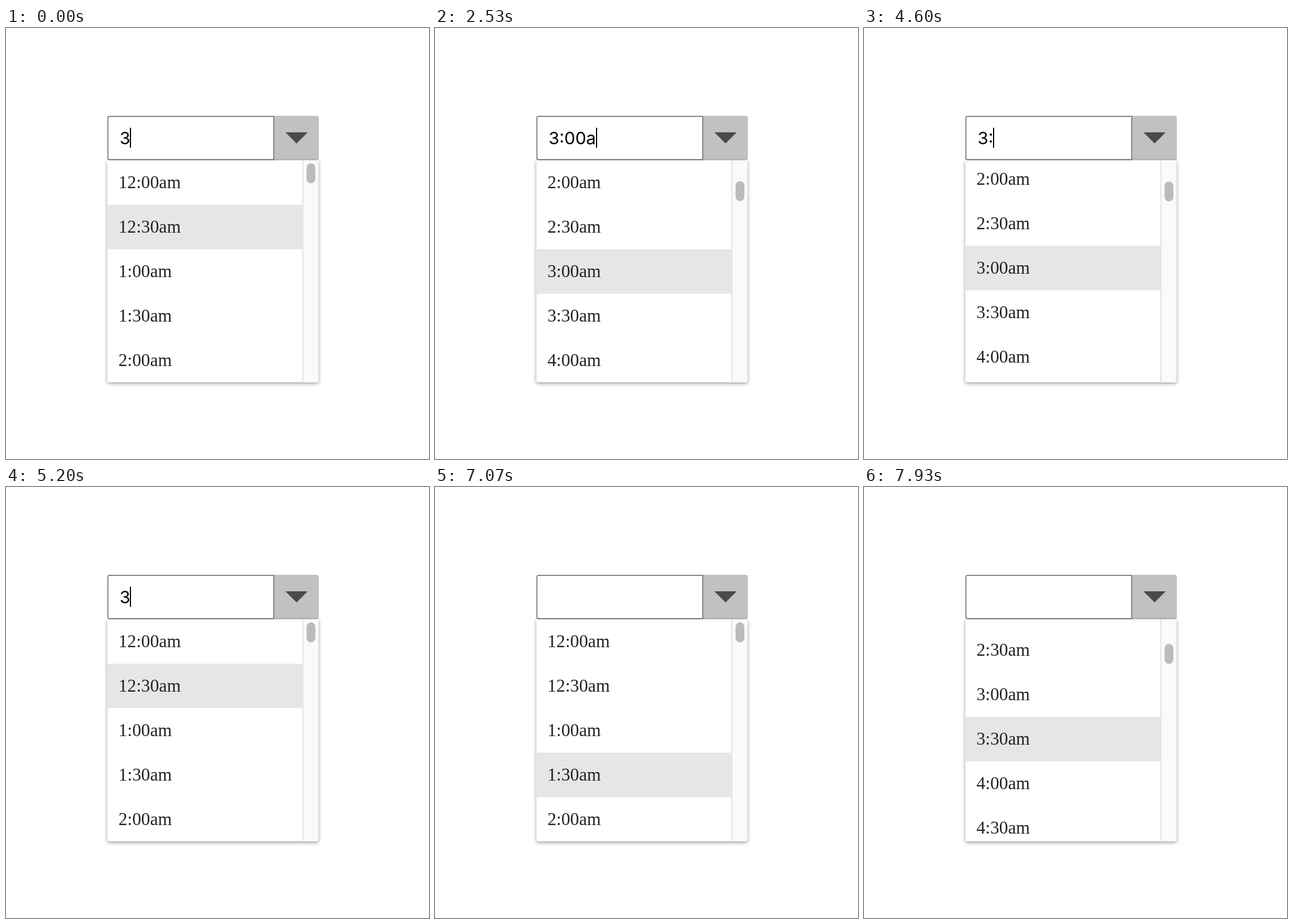
These frames come from a looping animation (741 by 756 pixels, 8000 ms). An HTML page with a canvas:

```html
<!DOCTYPE html>
<html lang="en">
<head>
<meta charset="utf-8">
<title>Time picker</title>
<style>
  html, body { margin: 0; width: 100%; height: 100%; overflow: hidden; background: #fff; }
  canvas { display: block; }
</style>
</head>
<body>
<canvas id="stage" width="741" height="756"></canvas>
<script>
const ctx = document.getElementById('stage').getContext('2d');
const LOOP = 8000, STEP = 1000 / 15;
const BLINK = 500, LOOKUP_DELAY = 105, SCROLL_TIME = 200;
const ROW = 78;
const LIST = { x: 177.5, y: 232, w: 370, h: 389.5, rowsW: 341.5 };

// Bursts of keys: start, gap, keys. "<" is backspace, "v" is arrow down.
const bursts = [
  [-240, 0, '3'], [440, 0, ':'], [1110, 190, '00'], [1970, 130, 'am'],
  [2510, 200, '<<'], [3060, 250, 'pm'], [3910, 140, '<<<<'], [4850, 730, '<<'],
  [6310, 400, 'vv'], [7065, 170, 'vv'], [7392, 200, 'vvv']
];
const keys = bursts.flatMap(([start, gap, chars]) =>
  [...chars].map((char, i) => ({ at: start + i * gap, char })));

const labels = Array.from({ length: 48 }, (_, i) =>
  (Math.floor(i / 2) % 12 || 12) + (i % 2 ? ':30' : ':00') + (i < 24 ? 'am' : 'pm'));

// Text edits pick the first label that contains the text; arrows pick the next row.
const edits = [], picks = [];
let text = '', row = 0;
for (const { at, char } of keys) {
  if (char === 'v') {
    picks.push({ at, row: ++row });
  } else {
    text = char === '<' ? text.slice(0, -1) : text + char;
    row = labels.findIndex(label => label.includes(text));
    edits.push({ at, text, typing: char !== '<' });
    picks.push({ at: at + LOOKUP_DELAY, row });
  }
}

const lastBefore = (events, t) => events.filter(e => e.at <= t).pop();
const swing = p => (1 - Math.cos(Math.PI * Math.min(1, p))) / 2;

// Each pick restarts the glide that brings its row to the middle.
function scrollAt(t) {
  let pos = 0;
  picks.forEach(({ at, row }, i) => {
    if (t < at) return;
    const end = Math.min(t, picks[i + 1]?.at ?? LOOP);
    pos += (Math.max(0, row - 2) * ROW - pos) * swing((end - at) / SCROLL_TIME);
  });
  return pos;
}

// Typing restarts the blink; deleting only shows the caret again.
function caretOn(t) {
  const anchor = lastBefore(edits.filter(e => e.typing), t).at;
  const toggles = time => Math.floor((time - anchor) / BLINK);
  return (toggles(t) - toggles(lastBefore(edits, t).at)) % 2 === 0;
}

function fillRound(x, y, w, h, radius, color) {
  ctx.fillStyle = color;
  ctx.beginPath();
  ctx.roundRect(x, y, w, h, radius);
  ctx.fill();
}

function drawField(text, caret) {
  fillRound(469, 154, 79, 78, [0, 4, 4, 0], '#c1c1c1');
  fillRound(177.5, 154, 292.5, 78, [4, 0, 0, 4], '#858585');
  fillRound(179.5, 156, 288.5, 74, [2, 0, 0, 2], '#fff');

  ctx.fillStyle = '#4a4a4a';
  ctx.beginPath();
  ctx.moveTo(489.5, 183);
  ctx.lineTo(528.5, 183);
  ctx.lineTo(509, 202.5);
  ctx.fill();

  ctx.font = '30.4px Inter, sans-serif';
  ctx.fillStyle = '#000';
  ctx.fillText(text, 199, 204);
  if (caret) ctx.fillRect(Math.round(198.7 + ctx.measureText(text).width), 175, 2, 35);
}

function drawList(scroll, selected) {
  ctx.save();
  ctx.shadowColor = 'rgba(0,0,0,.42)';
  ctx.shadowBlur = 6;
  ctx.shadowOffsetY = 2;
  fillRound(LIST.x, LIST.y, LIST.w, LIST.h, [0, 0, 4, 4], '#fff');
  ctx.restore();

  ctx.save();
  ctx.beginPath();
  ctx.roundRect(LIST.x, LIST.y, LIST.w, LIST.h, [0, 0, 4, 4]);
  ctx.clip();
  ctx.font = '31.2px "Liberation Serif", "Times New Roman", serif';
  labels.forEach((label, i) => {
    const y = LIST.y + i * ROW - scroll;
    if (i === selected) {
      ctx.fillStyle = '#e6e6e6';
      ctx.fillRect(LIST.x, y, LIST.rowsW, ROW);
    }
    ctx.fillStyle = '#222';
    ctx.fillText(label, 197, y + 49);
  });

  ctx.fillStyle = '#fafafa';
  ctx.fillRect(519, LIST.y, 29, LIST.h);
  ctx.fillStyle = '#e4e4e4';
  ctx.fillRect(519, LIST.y, 2, LIST.h);
  ctx.fillStyle = '#efefef';
  ctx.fillRect(546, LIST.y, 2, LIST.h);
  fillRound(526.5, Math.max(237.5, 236.2 + scroll * 0.1043), 15.5, 35, 7.75, '#bbb');
  ctx.restore();
}

function draw(t) {
  ctx.fillStyle = '#fff';
  ctx.fillRect(0, 0, 741, 756);
  drawField(lastBefore(edits, t).text, caretOn(t));
  drawList(scrollAt(t), lastBefore(picks, t).row);
}

const began = performance.now();
function tick() {
  const t = (performance.now() - began) % LOOP;
  // The picture advances 15 times a second; the small lead absorbs rounding.
  draw(Math.floor((t + 4) / STEP) * STEP);
  requestAnimationFrame(tick);
}
tick();
</script>
</body>
</html>
```
